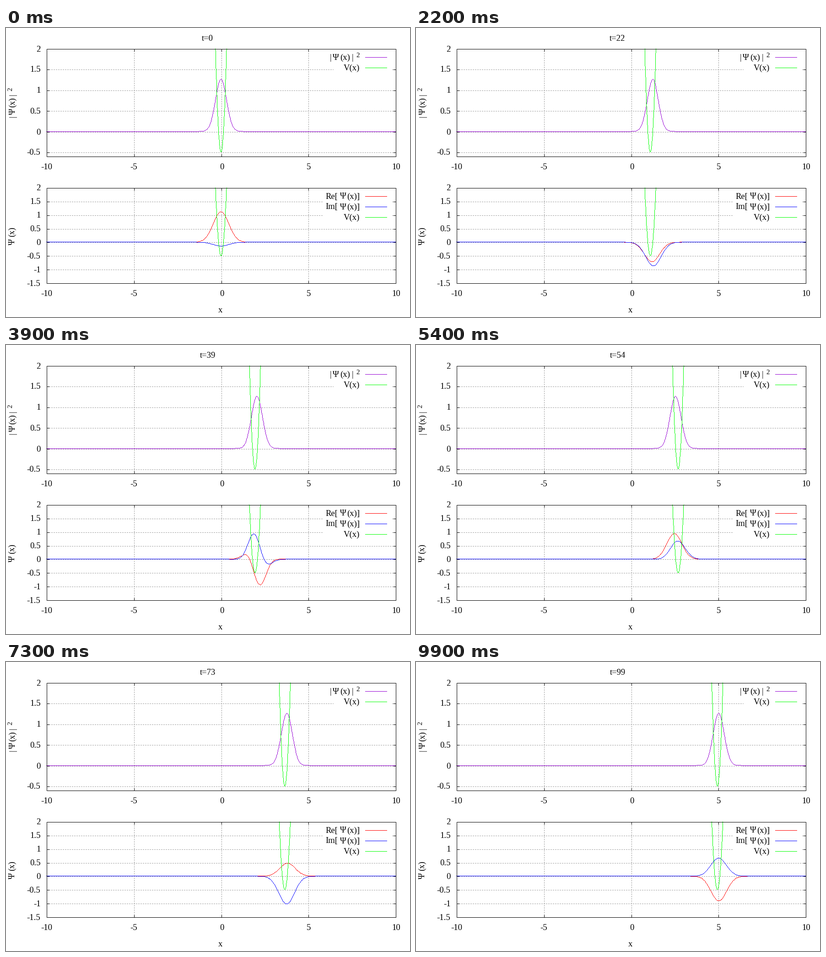
A matplotlib script that plays this animation: 883x634 px, repeating every 10 s.

```python
import numpy as np
import matplotlib.pyplot as plt
from matplotlib.animation import FuncAnimation
from matplotlib.patches import Polygon, Rectangle

W, H, DPI = 883, 634, 64
PX = 72 / DPI
FRAMES, INTERVAL = 100, 100
LEFT, RIGHT = 88, 851
SIZE = 18.67
PURPLE, GREEN, RED, BLUE, GREY = "#9400d3", "#00ff00", "#ff0000", "#0000ff", "#a0a0a0"

plt.rcParams["font.family"] = ["Liberation Serif", "DejaVu Serif"]
fig = plt.figure(figsize=(W / DPI, H / DPI), dpi=DPI, facecolor="white")
ax = fig.add_axes([0, 0, 1, 1])
ax.set_xlim(-0.5, W - 0.5)
ax.set_ylim(H - 0.5, -0.5)
ax.axis("off")


def text(x, y, s, ha="left", size=SIZE, rot=0):
    return ax.text(x, y, s, ha=ha, va="baseline", fontsize=size * PX,
                   rotation=rot, rotation_mode="anchor", zorder=6)


def line(xs, ys, color="black", z=5, **kw):
    ax.plot(xs, ys, color=color, lw=PX, antialiased=False, zorder=z, **kw)


def pieces(x, y, parts, vertical=False):
    """Lay out (offset, string[, raise, size]) parts along a baseline."""
    for off, s, *rest in parts:
        up, size = rest or (0, SIZE)
        if vertical:
            text(x - up, y - off, s, size=size, rot=90)
        else:
            text(x + off, y - up, s, size=size)


def to_px(x):
    return LEFT + (x + 10) * (RIGHT - LEFT) / 20


X = np.linspace(-10, 10, 512)
XP = np.round(to_px(X))
COLS = np.arange(LEFT, RIGHT + 1)
EDGES = np.arange(LEFT, RIGHT + 2) - 0.5


def hairline(ys):
    """Outline of a crisp one-pixel stroke through the sampled heights."""
    ys = np.round(ys)
    row = np.round(np.interp(COLS, XP, ys))
    cut = np.floor(np.interp(EDGES, XP, ys)) + 0.5
    top = np.minimum(np.minimum(cut[:-1], cut[1:]), row - 0.5)
    low = np.maximum(np.maximum(cut[:-1], cut[1:]), row + 0.5)
    xs = np.repeat(EDGES, 2)[1:-1]
    upper_side = np.column_stack([xs, np.repeat(top, 2)])
    lower_side = np.column_stack([xs, np.repeat(low, 2)])
    return np.vstack([upper_side, lower_side[::-1]])


class Panel:
    def __init__(self, top, bottom, ymin, key):
        self.top, self.bottom, self.ymin = top, bottom, ymin
        self.clip = Rectangle((LEFT - 0.5, top - 0.5), RIGHT - LEFT + 1,
                              bottom - top + 1, transform=ax.transData)
        for v in np.arange(np.ceil(ymin * 2) / 2, 2.01, 0.5):
            y = round(float(self.y(v)))
            text(75, y + 6, f"{v:g}", "right")
            if top < y < bottom:
                self.grid([LEFT, RIGHT], [y, y])
                line([LEFT, LEFT + 5], [y, y])
                line([RIGHT - 5, RIGHT], [y, y])
        for v in range(-10, 11, 5):
            x = round(to_px(v))
            text(x + (v >= 0), bottom + 29, str(v), "center")
            if LEFT < x < RIGHT:
                self.grid([x, x], [bottom, top])
                line([x, x], [top, top + 5])
                line([x, x], [bottom - 5, bottom])
        kx, ky, kh = key
        ax.add_patch(Rectangle((kx, ky), 841 - kx, kh, fc="white", lw=0, zorder=2))
        line([LEFT, RIGHT, RIGHT, LEFT, LEFT], [top, top, bottom, bottom, top])

    def grid(self, xs, ys):
        line(xs, ys, GREY, z=1, dashes=(2, 2), dash_capstyle="butt")

    def y(self, v):
        return self.top + (2 - v) * (self.bottom - self.top) / (2 - self.ymin)

    def curve(self, color, key_y):
        line([784, 831], [key_y, key_y], color)
        c = ax.add_patch(Polygon([(0, 0), (0, 0), (0, 0)], fc=color, lw=0,
                                 antialiased=False, zorder=4))
        c.set_clip_path(self.clip)
        return c

    def plot(self, curve, values):
        curve.set_xy(hairline(self.y(values)))


upper = Panel(45, 281, -0.6, (715, 51, 48))
lower = Panel(350, 559, -1.5, (693, 356, 70))

density = upper.curve(PURPLE, 63)
well_up = upper.curve(GREEN, 86)
real = lower.curve(RED, 368)
imag = lower.curve(BLUE, 391)
well_low = lower.curve(GREEN, 414)

square = [(0, "|"), (6, "Ψ"), (23, "(x)"), (48, "|"), (58, "2", 6, 15)]
pieces(707, 69, square)
pieces(19, 196, square, vertical=True)
pieces(18, 475, [(0, "Ψ"), (18, "(x)")], vertical=True)
for y, name in ((374, "Re["), (397, "Im[")):
    text(698, y, name)
    text(729, y, "Ψ")
    text(773, y, "(x)]", "right")
for y in (92, 420):
    text(773, y, "V(x)", "right")
text(468, 623, "x", "center")
title = text(440, 27, "", "center")

# Gaussian packet in a harmonic well (H = p^2 + 25 u^2) that hops along x.
STEP, TURN, PHASE = 0.05, 0.25, 0.1256


def packet(n):
    """Centre, momentum and phase after n hops, each followed by a free turn."""
    z, phase = 0j, 0.0
    for k in range(n + 1):
        if k:
            z -= STEP
        new = z * np.exp(-1j * TURN)
        phase += 2.5 * (new.real * new.imag - z.real * z.imag) - PHASE
        z = new
    return STEP * n + z.real, 5 * z.imag, phase


def draw(n):
    q, p, phase = packet(n)
    d = X - q
    psi = (5 / np.pi) ** 0.25 * np.exp(-2.5 * d**2 + 1j * (p * d + phase))
    well = np.minimum(25 * (X - STEP * n) ** 2 - 0.5, 20)
    upper.plot(density, abs(psi) ** 2)
    upper.plot(well_up, well)
    lower.plot(real, psi.real)
    lower.plot(imag, psi.imag)
    lower.plot(well_low, well)
    title.set_text(f"t={n}")
    return density, well_up, real, imag, well_low, title


anim = FuncAnimation(fig, draw, frames=FRAMES, interval=INTERVAL,
                     repeat=True, repeat_delay=0, blit=False)
plt.show()
```
